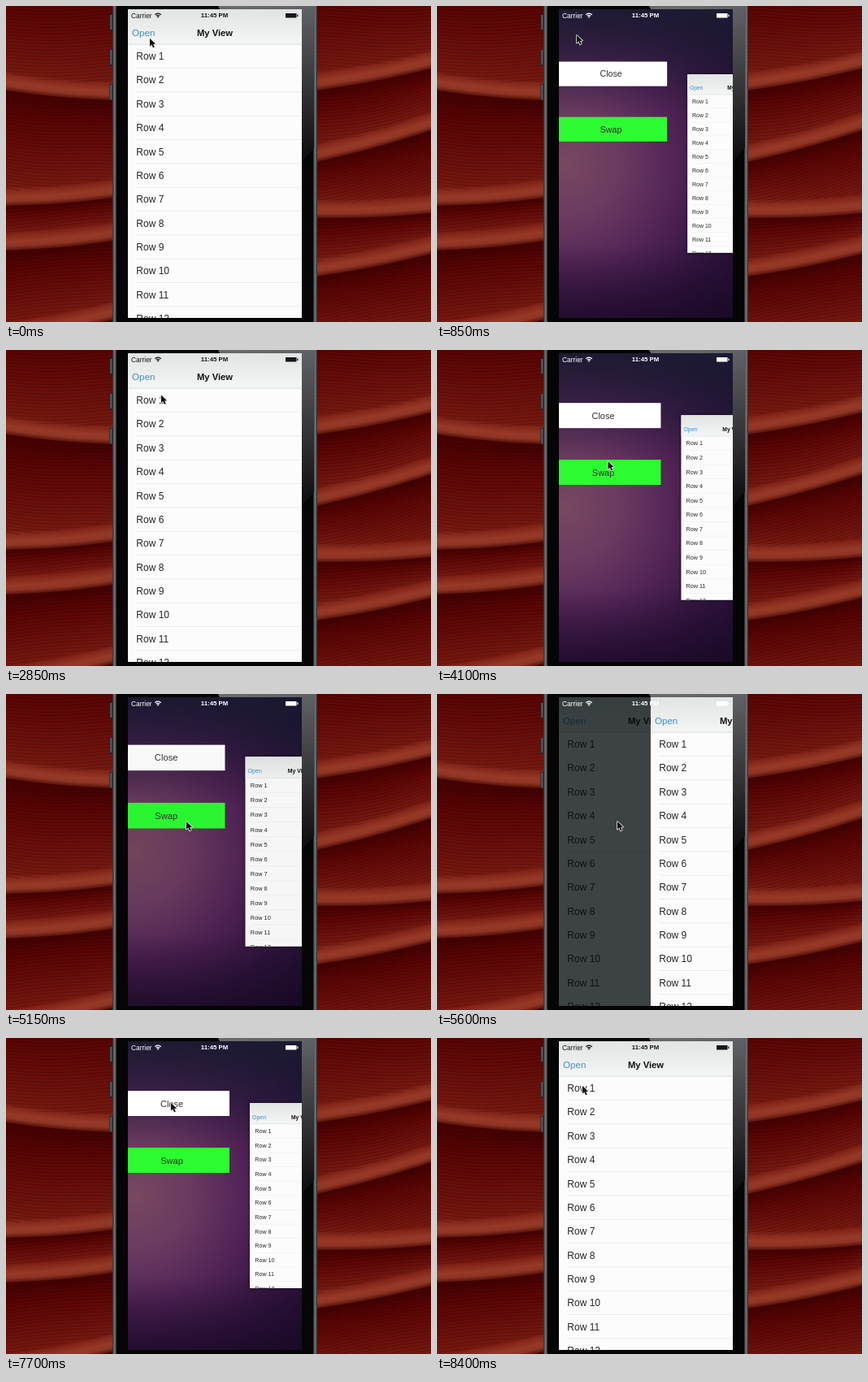
These frames come from a looping animation (523 by 389 pixels, 8450 ms). An HTML page with a canvas:

```html
<!DOCTYPE html>
<html lang="en">
<head>
<meta charset="utf-8">
<title>Side menu</title>
<style>
html, body { margin: 0; width: 100%; height: 100%; overflow: hidden; background: #000; }
canvas { display: block; }
</style>
</head>
<body>
<canvas id="stage" width="523" height="389"></canvas>
<script>
const W = 523, H = 389, LOOP = 8450;
const ctx = document.getElementById('stage').getContext('2d');
const FONT = '"Liberation Sans", Arial, sans-serif';
const SCREEN = { x: 150, y: 4, w: 214, h: 380, cy: 194 };
const ROW = 29.35, NAV = 43.5;

// Moments, in ms, at which the taps take effect
const OPEN_1 = 404, CLOSE_1 = 2150, OPEN_2 = 3768, SWAP = 5120, OPEN_3 = 6822, CLOSE_2 = 7700;
const SWAP_END = SWAP + 760;

const clamp = v => Math.max(0, Math.min(1, v));
const mix = (a, b, k) => a + (b - a) * k;
const smooth = v => { v = clamp(v); return v * v * (3 - 2 * v); };
const during = (t, a, b) => smooth((t - a) / (b - a));

// Underdamped spring from 0 to 1, overshooting by about 5.5 percent
function spring(ms) {
  if (ms <= 0) return 0;
  const z = 0.68, w = 0.0096, q = Math.sqrt(1 - z * z);
  return 1 - Math.exp(-z * w * ms) * (Math.cos(w * q * ms) + z / q * Math.sin(w * q * ms));
}

// Critically damped return from 1 to 0
function settle(ms) {
  if (ms <= 0) return 1;
  if (ms > 620) return 0;
  const k = ms * 0.0135;
  return (1 + k) * Math.exp(-k);
}

function rect(c, x, y, w, h, fill) {
  c.fillStyle = fill;
  c.fillRect(x, y, w, h);
}

function label(c, str, x, y, size, fill, align = 'left', weight = 'normal') {
  c.font = `${weight} ${size}px ${FONT}`;
  c.textAlign = align;
  c.textBaseline = 'alphabetic';
  c.fillStyle = fill;
  c.fillText(str, x, y);
}

// Spread the colours evenly over a gradient
function ramp(g, ...cols) {
  cols.forEach((col, i) => g.addColorStop(i / (cols.length - 1), col));
  return g;
}

function layer(w, h, paint) {
  const cv = document.createElement('canvas');
  cv.width = w;
  cv.height = h;
  paint(cv.getContext('2d'));
  return cv;
}

// Folded red cloth: each fold is dark on top and ends in a narrow lit crest
function cloth(c, x0, x1, folds) {
  const crest = 22;
  for (let x = x0; x < x1; x++) {
    const k = (x - x0) / (x1 - x0);
    let top = -30;
    folds.forEach(([left, right], i) => {
      const end = mix(left, right, k) + 2 * Math.sin(Math.PI * k);
      const lit = end - crest;
      rect(c, x, top, 1, lit - top + 1, ramp(c.createLinearGradient(0, top, 0, lit),
        '#420000', '#560403', '#620a07', '#6b110c', '#76190f'));
      rect(c, x, lit, 1, crest + 1, ramp(c.createLinearGradient(0, lit, 0, end),
        '#7c2014', '#8a2d1e', '#963927', '#8f3424', '#541409'));
      for (let y = top + 5; y < lit; y += 4) {
        rect(c, x, y + 3 * Math.sin(x / 34 + i), 1, 1, 'rgba(25,0,0,.2)');
      }
      top = end;
    });
  }
}

const backdrop = layer(W, H, c => {
  cloth(c, 0, 132, [[104, 116], [246, 236], [301, 289], [412, 386], [500, 490]]);
  cloth(c, 382, W, [[104, 77], [192, 153], [261, 255], [333, 305], [425, 410]]);

  // Phone body
  for (let i = 0; i < 3; i++) {
    rect(c, 127.5, 10 + 43 * i, 4, 20, '#272729');
    rect(c, 128.5, 11 + 43 * i, 1.5, 18, '#66666a');
  }
  rect(c, 131, 0, 252, H, '#050506');
  [131, 378].forEach(x => {
    rect(c, x, 0, 5, H, ramp(c.createLinearGradient(x, 0, x + 5, 0), '#27282a', '#737578', '#27282a'));
  });
  c.fillStyle = ramp(c.createLinearGradient(300, 0, 345, 205), '#68696c', '#39393c', '#08080a');
  c.beginPath();
  c.moveTo(261, 0);
  c.lineTo(379, 0);
  c.lineTo(379, 175);
  c.lineTo(363, 193);
  c.lineTo(364, 4);
  c.lineTo(263, 4);
  c.fill();
});

const wallpaper = layer(SCREEN.w, SCREEN.h, c => {
  const { w, h } = SCREEN;
  rect(c, 0, 0, w, h, ramp(c.createRadialGradient(8, 190, 0, 8, 190, 270),
    '#77485f', '#6a3a61', '#522456', '#341541', '#1d0d2d'));
  rect(c, 0, 0, w, 130, ramp(c.createLinearGradient(0, 0, 0, 130), 'rgba(27,27,50,.9)', 'rgba(27,27,50,0)'));
  rect(c, 0, 290, w, 90, ramp(c.createLinearGradient(0, 290, 0, h), 'rgba(26,8,38,0)', 'rgba(26,8,38,.7)'));
});

function list(x, scale) {
  const { w, h, cy } = SCREEN;
  ctx.save();
  ctx.translate(x, cy - h / 2 * scale);
  ctx.scale(scale, scale);
  ctx.shadowColor = 'rgba(0,0,0,.5)';
  ctx.shadowBlur = scale < 0.995 ? 4 : 0;
  rect(ctx, 0, 0, w, h, '#fcfcfc');
  ctx.shadowBlur = 0;
  ctx.beginPath();
  ctx.rect(0, 0, w, h);
  ctx.clip();
  rect(ctx, 0, 0, w, NAV, ramp(ctx.createLinearGradient(0, 0, 0, NAV), '#e2e4e4', '#f4f5f5'));
  rect(ctx, 0, NAV - 0.7, w, 0.7, '#d0d2d2');
  label(ctx, 'Open', 5, 33, 11.6, '#3c92d4');
  label(ctx, 'My View', 107, 33, 11.2, '#111', 'center', 'bold');
  for (let i = 0; i < 12; i++) {
    const top = NAV + i * ROW;
    label(ctx, 'Row ' + (i + 1), 10.3, top + 18.6, 12, '#262626');
    rect(ctx, 10, top + ROW - 1, w - 10, 1, '#ededed');
  }
  ctx.restore();
}

function menu(p) {
  const m = 1.5 - 0.5 * p, right = 125 + 150 * p;
  const button = (name, dy, fill) => {
    const y = SCREEN.cy + dy * m, w = 142 * m, h = 31 * m;
    rect(ctx, right - w, y - h / 2, w, h, fill);
    label(ctx, name, right - w / 2, y + 4 * m, 11 * m, '#333', 'center');
  };
  button('Close', -113.5, '#ffffff');
  button('Swap', -43.5, '#2cfb31');
}

function statusBar(col) {
  label(ctx, 'Carrier', 154, 14.5, 8.4, col);
  label(ctx, '11:45 PM', 256.5, 14.3, 7.8, col, 'center', 'bold');
  ctx.strokeStyle = col;
  ctx.lineWidth = 1.2;
  [2.6, 4.8].forEach(r => {
    ctx.beginPath();
    ctx.arc(187, 14, r, -Math.PI * 0.78, -Math.PI * 0.22);
    ctx.stroke();
  });
  ctx.fillStyle = col;
  ctx.beginPath();
  ctx.arc(187, 13.6, 1, 0, 7);
  ctx.fill();
  rect(ctx, 344, 9, 13.5, 5.5, col);
  rect(ctx, 358.3, 10.5, 1.2, 2.5, col);
}

// Pointer moves: start, end, x, y
const MOVES = [
  [300, 700, 172, 36],
  [1300, 2050, 208, 75],
  [2300, 3400, 174, 36],
  [3768, 4160, 213, 144],
  [4200, 4950, 222, 157],
  [6000, 6800, 174, 49],
  [7000, 7550, 203, 80],
  [7800, 8350, 179, 59]
];

function pointer(t) {
  let x = 177, y = 40;
  MOVES.forEach(([from, to, tx, ty]) => {
    const k = during(t, from, to);
    x = mix(x, tx, k);
    y = mix(y, ty, k);
  });
  ctx.save();
  ctx.translate(x, y);
  ctx.beginPath();
  [[0, 0], [0, 9.6], [2.3, 7.5], [4, 11.3], [5.7, 10.5], [4.1, 6.9], [7, 6.7]]
    .forEach(([px, py]) => ctx.lineTo(px, py));
  ctx.closePath();
  ctx.lineJoin = 'round';
  ctx.lineWidth = 1.6;
  ctx.strokeStyle = '#e8e8e8';
  ctx.stroke();
  ctx.fillStyle = '#111';
  ctx.fill();
  ctx.restore();
}

// How far the menu is open: 0 closed, 1 at rest, above 1 while overshooting
function openness(t) {
  if (t < CLOSE_1) return spring(t - OPEN_1);
  if (t < OPEN_2) return settle(t - CLOSE_1);
  if (t < SWAP) return spring(t - OPEN_2);
  if (t < OPEN_3) return 1 - during(t, SWAP, SWAP + 260);
  if (t < CLOSE_2) return spring(t - OPEN_3);
  return settle(t - CLOSE_2);
}

function draw(t) {
  const { x, y, w, h } = SCREEN;
  const p = openness(t);
  const swapping = t >= SWAP && t < SWAP_END;

  ctx.drawImage(backdrop, 0, 0);
  ctx.save();
  ctx.beginPath();
  ctx.rect(x, y, w, h);
  ctx.clip();
  ctx.drawImage(wallpaper, x, y);
  rect(ctx, x, y, w, h, `rgba(30,8,42,${0.5 * clamp(1 - p)})`);
  if (p > 0) menu(p);
  list(x + 150 * p, 1 - 0.4 * p);
  if (swapping) {
    rect(ctx, x, y, w, h, `rgba(5,12,14,${0.77 * during(t, SWAP, SWAP + 280)})`);
    list(mix(x + w, x, during(t, SWAP + 220, SWAP_END)), 1);
  }
  statusBar(swapping || p > 0.004 ? '#ffffff' : '#161616');
  ctx.restore();
  pointer(t);
}

const start = performance.now();
function tick() {
  const t = (performance.now() - start) % LOOP;
  draw(Math.floor(t / 50) * 50);
  requestAnimationFrame(tick);
}
tick();
</script>
</body>
</html>
```
